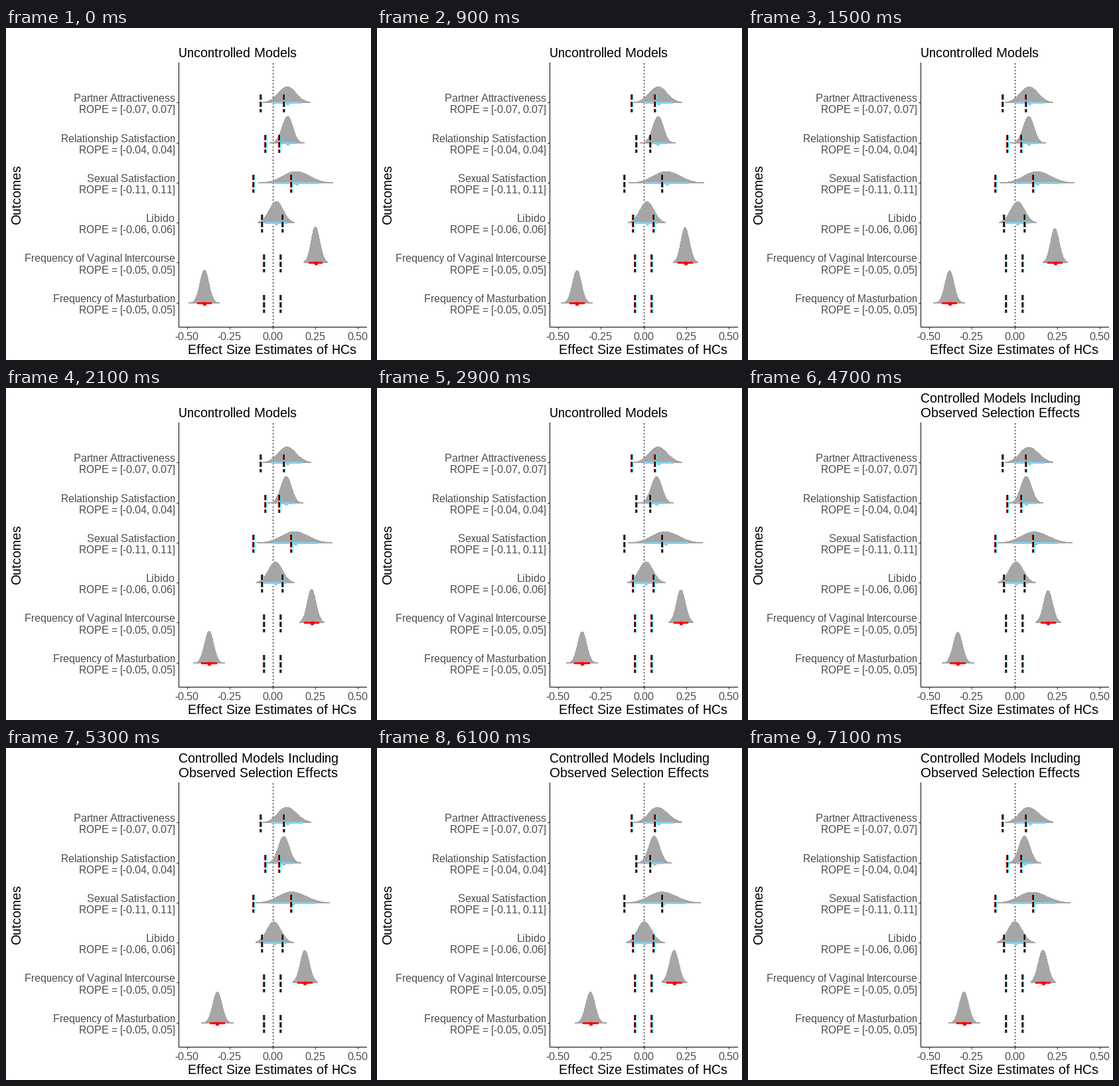
Animation, 550 px wide and 500 px high, one loop 8 s. Source, as a matplotlib script:

```python
import numpy as np
import matplotlib.pyplot as plt
from matplotlib.animation import FuncAnimation

W, H, DPI = 550, 500, 72
FRAME_MS, FRAMES = 100, 80
STEPS, START, STEP_MS, TITLE_STEP = 34, 500, 200, 18
ZERO, UNIT = 402, 257
FIRST_ROW, ROW_GAP = 112.7, 60.3
RED, BLUE, CYAN, GREY = "#ff0000", "#87ceeb", "#00ffff", "#a6a6a6"

plt.rcParams.update({
    "font.family": "Liberation Sans",
    "text.hinting": "native",
    "text.hinting_factor": 1,
    "text.kerning_factor": 6,
    "lines.scale_dashes": False,
})

# Each state: low end, interval start, mode, interval end, high end, peak height.
ROWS = [
    dict(name="Partner Attractiveness", rope=0.07, color=BLUE, dip=0,
         begin=(387, 402, 424, 445, 459, 24), end=(387, 401, 422, 448, 460, 23)),
    dict(name="Relationship Satisfaction", rope=0.04, color=BLUE, dip=0.5,
         begin=(397, 411, 424.5, 437, 450, 40.5), end=(388, 403, 416.5, 430, 442, 41)),
    dict(name="Sexual Satisfaction", rope=0.11, color=BLUE, dip=0,
         begin=(380, 405, 437, 470, 493, 17.5), end=(375, 396, 428, 464, 486, 16.5)),
    dict(name="Libido", rope=0.06, color=BLUE, dip=0.5,
         begin=(379, 390, 407.5, 424, 435, 32), end=(375, 385, 402, 420, 433, 32)),
    dict(name="Frequency of Vaginal Intercourse", rope=0.05, color=RED, dip=3,
         begin=(448, 456, 466, 477, 485, 54), end=(426, 433, 444.5, 456, 464, 49.5)),
    dict(name="Frequency of Masturbation", rope=0.05, color=RED, dip=1.5,
         begin=(275, 288, 299, 310, 322, 50), end=(302, 314, 325.5, 337, 350, 47)),
]

fig = plt.figure(figsize=(W / DPI, H / DPI), dpi=DPI, facecolor="white")
ax = fig.add_axes([0, 0, 1, 1])
ax.set(xlim=(0, W), ylim=(H, 0))
ax.axis("off")


def line(xs, ys, color="black", width=1, z=1, **style):
    return ax.plot(xs, ys, color=color, lw=width, zorder=z, antialiased=False, snap=False,
                   solid_capstyle="butt", dash_capstyle="butt", **style)[0]


def label(x, y, text, size=16, color="#4d4d4d", ha="right", **style):
    return ax.text(x, y, text, size=size, color=color, ha=ha, va="baseline", **style)


def rope_mark(x, y):
    """Black dashes with a red left edge and a cyan right edge."""
    for offset, width, color in ((-1.5, 1, RED), (0, 2, "black"), (1.5, 1, CYAN)):
        line([x + offset] * 2, [y - 12, y + 15], color, width, 5, linestyle=(0, (7, 3)))


def draw_axes():
    line([ZERO + 0.5] * 2, [450, 52], linestyle=(0, (1, 3)))
    line([260.5, 260.5], [52, 451], z=7)
    line([260, 544], [450.5, 450.5], z=7)
    for value in np.arange(-0.5, 0.51, 0.25):
        x = np.floor(ZERO + UNIT * value) + 0.5
        line([x, x], [451, 454], "#333333")
        label(x - 1, 470, f"{value:.2f}", ha="center")
    label(401, 491, "Effect Size Estimates of HCs", 20, "black", "center")
    label(22, 251, "Outcomes", 20, "black", "center", rotation=90, rotation_mode="anchor")


def draw_row(index, row):
    center, rope = FIRST_ROW + ROW_GAP * index, row["rope"]
    y = row["y"] = np.floor(center)
    line([257, 260], [y + 0.5, y + 0.5], "#333333")
    label(255, y - 1, row["name"])
    label(255, np.floor(center + 16.2), f"ROPE = [-{rope:.2f}, {rope:.2f}]")
    for side in (-1, 1):
        rope_mark(np.floor(ZERO + side * rope * UNIT), y)
    row["hill"] = ax.fill([0, 0, 0], [0, 0, 0], color=GREY, lw=0, zorder=2,
                          antialiased=False, snap=False)[0]
    row["bar"] = line([], [], row["color"], 3, 3)
    row["dot"] = line([], [], row["color"], 0, 4, marker="o", markersize=6, markeredgewidth=0)


def hill_points(low, left, mode, right, high, height, y):
    x = np.linspace(low, high, 160)
    sd = np.where(x < mode, mode - left, right - mode) / 1.645
    top = np.maximum(height * np.exp(-((x - mode) / sd) ** 2 / 2), 0.6)
    return np.column_stack([np.r_[low, x, high], np.r_[y + 1, y + 0.5 - top, y + 1]])


def update(frame):
    time = frame * FRAME_MS
    step = int(np.clip((time - START) // STEP_MS + 1, 0, STEPS))
    u = step / STEPS
    if step < TITLE_STEP:
        lines = "", "Uncontrolled Models"
    else:
        lines = "Controlled Models Including", "Observed Selection Effects"
    for text, content in zip(titles, lines):
        text.set_text(content)
    for row in ROWS:
        state = (1 - u) * np.array(row["begin"]) + u * np.array(row["end"])
        state[5] -= row["dip"] * 4 * u * (1 - u)
        y, (left, right) = row["y"], state[[1, 3]]
        row["hill"].set_xy(hill_points(*state, y))
        row["bar"].set_data([left, right], [y + 0.5, y + 0.5])
        row["dot"].set_data([(left + right) / 2], [y + 0.5])
    return []


draw_axes()
for index, row in enumerate(ROWS):
    draw_row(index, row)
titles = [label(260, y, "", 20, "black", "left") for y in (22, 44)]

anim = FuncAnimation(fig, update, frames=FRAMES, interval=FRAME_MS, repeat=True, repeat_delay=0)
plt.show()
```
